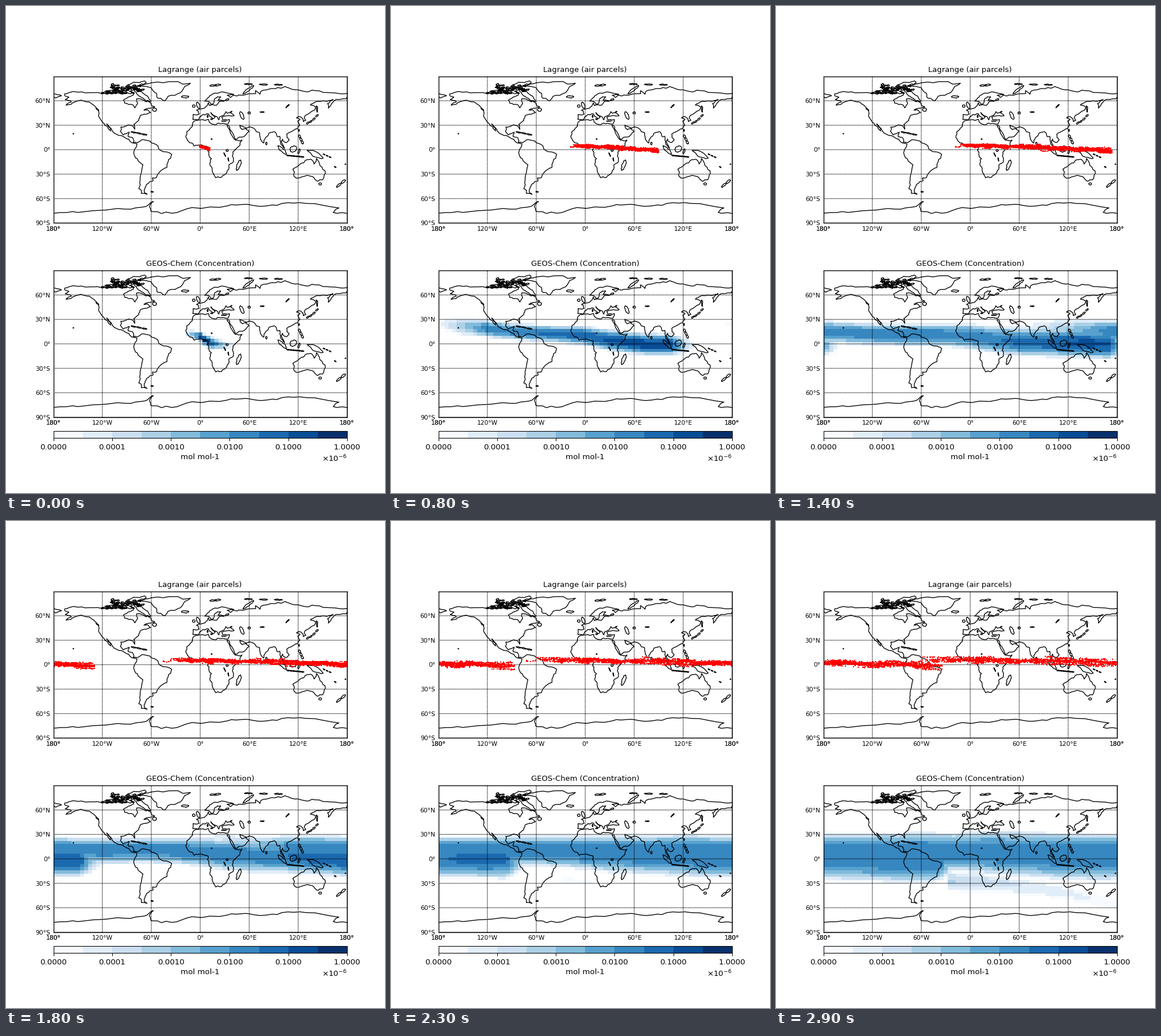
A matplotlib script that plays this animation: 660x849 px, repeating every 3000 ms.

```python
import numpy as np
import matplotlib.pyplot as plt
from matplotlib.animation import FuncAnimation
from matplotlib.collections import LineCollection
from matplotlib.colors import ListedColormap

W, H, DPI = 660, 849, 96
FRAMES, INTERVAL = 30, 100
LEFT, RIGHT = 82.5, 594.0
TOPS = (122.6, 461.1)
MAP_H = (RIGHT - LEFT) / 2

rng = np.random.default_rng(4)
plt.rcParams["font.family"] = "DejaVu Sans"
fig = plt.figure(figsize=(W / DPI, H / DPI), dpi=DPI, facecolor="white")
blues = ListedColormap(plt.get_cmap("Blues")(np.linspace(0, 1, 10)))

# ---------- coastlines: a few key points, roughened by midpoint displacement ----------
coasts = []


def roughen(pts, amount=0.09, rounds=2):
    for _ in range(rounds):
        step = np.diff(pts, axis=0)
        size = np.minimum(np.hypot(*step.T), 8)[:, None]
        mids = pts[:-1] + step / 2 + rng.normal(0, amount, step.shape) * size
        out = np.empty((2 * len(pts) - 1, 2))
        out[::2], out[1::2] = pts, mids
        pts = out
    return pts


def coast(*coords):
    coasts.append(roughen(np.array(coords, float).reshape(-1, 2)))


def isle(lon, lat, rx, ry, tilt=0, amount=0.09):
    """A ragged ellipse; tilt is in degrees."""
    a = np.linspace(0, 2 * np.pi, 9)
    z = (rx * np.cos(a) + 1j * ry * np.sin(a)) * np.exp(1j * np.radians(tilt))
    coasts.append(roughen(np.c_[lon + z.real, lat + z.imag], amount))


def chain(start, end, count, rx, ry, bow=0):
    """Islands strung along a bowed line."""
    tilt = np.degrees(np.arctan2(end[1] - start[1], end[0] - start[0]))
    for s in (np.arange(count) + .5) / count:
        lon, lat = np.array(start) + s * np.subtract(end, start)
        isle(lon, lat + bow * np.sin(np.pi * s), rx, ry, tilt)


# North America: Arctic, Atlantic and Gulf shores
coast(-166, 66, -166, 68.5, -156.5, 71.3, -141, 69.7, -129, 70, -115, 68.5, -95, 68,
      -95, 71.5, -86, 68.5, -82, 69.5, -82, 67, -87, 65, -94, 61, -92.5, 57, -82.5, 55,
      -80, 51.3, -76.7, 56.5, -78, 62.4, -70, 61, -66, 58.7, -64.5, 60.3, -60, 55,
      -55.7, 52.3, -66, 50.2, -69, 48.5, -65, 49, -61, 45.5, -66, 43.6, -70, 43,
      -74, 40.6, -76, 35.3, -81.4, 31, -80.3, 25.2, -82.7, 29, -89.5, 29.8, -97.3, 27.8,
      -97.8, 22.5, -94.5, 18.2, -90.5, 19.8, -87, 21.5, -88.3, 16, -83.3, 15, -82, 9, -77, 8.5)
# South America, then the Pacific shore up to Alaska
coast(-77, 8.5, -72, 12, -62, 10.7, -52, 4.9, -50, 0, -35, -6, -39, -13.5, -41, -22,
      -48.5, -26, -53.5, -34, -58.3, -34.5, -58, -38.3, -62.2, -39.5, -65, -42, -67.5, -46,
      -68.5, -52, -65.2, -54.7, -72, -53.8, -75.3, -48, -73.7, -38, -70.3, -18.5,
      -76, -14, -81.3, -5, -80, 1, -77.5, 7, -80, 8, -83, 8.3, -87.6, 13, -94.3, 16.2,
      -105.6, 20.2, -109, 25.7, -114.7, 31.7, -109.8, 23, -115, 29, -120.6, 34.5,
      -124.3, 40.3, -124.6, 48.3, -130.2, 54.5, -136, 58.5, -146, 60.8, -154, 58.5,
      -164.5, 54.6, -158, 58.5, -165.5, 61.5, -161, 64.5, -166, 66)
# Greenland
coast(-73, 78.3, -60, 76, -54, 69.5, -51.5, 63, -43, 60, -39.5, 65.5, -24, 70, -20, 76,
      -12, 81.5, -33, 83.5, -60, 82, -73, 78.3)
# Northern and eastern Asia
coast(26, 71, 41, 67.7, 33, 66.7, 37, 64, 44, 66, 47, 67, 68, 68.8, 68, 72.5, 73, 68,
      75, 72, 87, 75, 104, 77.6, 113, 74, 130, 71, 140, 72.5, 160, 69.8, 180, 69)
coast(-180, 69, -170, 66.2, -180, 65)
coast(180, 65, 179, 62.5, 164, 60, 157, 51, 156, 56.5, 163, 61.5, 155, 59.3, 143, 59.3,
      135, 54.7, 141, 53, 140, 48.5, 127.5, 39.7, 129.4, 36, 126.4, 34.5, 126, 37.7,
      121.5, 40.5, 118, 39, 122.3, 37.3, 119.5, 35, 121.8, 30, 119, 25.5, 110, 21.3,
      106, 19, 109, 12, 105, 8.7, 101, 13, 99.3, 10, 103.5, 1.4, 98.5, 8, 97.5, 16.5,
      94.3, 16, 91, 22.2)
# Southern Asia, then around Africa
coast(91, 22.2, 87, 21.3, 80.2, 15, 77.5, 8.1, 73, 17, 72.7, 21, 69, 22, 67, 25, 57, 26.5,
      48.5, 30, 51.5, 24.5, 56.3, 26, 59.8, 22.5, 52, 15.5, 43.3, 12.8, 39, 21.5, 34.9, 29.4,
      32.6, 29.9, 37.2, 20, 43.2, 11.6, 51.2, 11.8, 48, 4.5, 40, -2.8, 40.6, -15, 35, -20,
      35, -24, 32, -28.8, 26, -34, 19, -34.5, 14.5, -22.5, 11.8, -17, 13.8, -11, 9, -1,
      9.5, 3.5, 6, 4.3, 1, 5.9, -7.5, 4.4, -13, 8.5, -17.3, 14.7, -16.5, 22, -9.8, 29.8,
      -6, 35.8, 10, 37.3, 10.8, 34.3, 19, 30.4, 22, 32.6, 34, 31.3)
# Mediterranean, western Europe and the Baltic
coast(34, 31.3, 36, 36.8, 27.5, 36.8, 26.5, 39.8, 29, 41, 41.5, 41.6, 37.5, 45, 39, 47.2,
      33.6, 44.7, 31, 46.5, 28, 42, 23.5, 40, 22.8, 36.5, 19.5, 41, 13, 45.5, 18.4, 40,
      15.7, 38, 10, 44, 3.2, 43.2, -2, 36.8, -9, 37, -8.8, 43.2, -1.5, 43.6, -4.6, 48.3,
      1.5, 50.2, 8.5, 54, 10, 57.5, 11, 54.2, 20, 54.5, 23.5, 59.2, 30, 59.9, 22, 60.5,
      25, 65, 21, 65, 17.3, 61.5, 16.5, 57, 13, 55.5, 10.5, 59, 5.5, 59.5, 11, 64.7, 18, 69.5,
      26, 71)
# Australia and New Guinea
coast(142.5, -10.8, 146.5, -19, 153, -26, 150, -37, 143.5, -38.8, 137.5, -33, 131, -31.5,
      118, -35, 115.2, -33, 113.5, -24, 122, -18, 131, -12.2, 136.5, -12.2, 139.5, -17.6,
      142.5, -10.8)
coast(131, -.8, 145, -4.3, 150.7, -10.4, 138, -8, 131, -.8)
# Antarctica
coast(-180, -78, -150, -77, -115, -74, -85, -73, -68, -70, -57.5, -63.5, -62, -69, -60, -76,
      -35, -78, -10, -71, 33, -69, 55, -67, 75, -69.5, 100, -66, 130, -66, 170, -71.5,
      163, -77, 180, -78.2)

# Arctic archipelago
isle(-72, 67.5, 14, 2.6, -38, .13)
isle(-79, 80, 13, 2.6, 12, .13)
isle(-110, 71, 7, 1.9, 0, .13)
for _ in range(42):
    isle(rng.triangular(-122, -88, -70), rng.uniform(68.5, 80.5),
         rng.uniform(1.2, 4), rng.uniform(.4, 1.1), rng.uniform(-25, 25), .16)
# island arcs: Antilles, Svalbard to Severnaya, Japan, Philippines, Sunda, Melanesia
chain((-85, 22), (-65, 18), 3, 3.2, .6)
chain((13, 78.5), (24, 79.5), 2, 4, 1)
chain((50, 80.5), (105, 79.5), 3, 5, .7)
chain((130, 32), (145, 44), 4, 2, .9, -2)
chain((121, 18), (126, 7), 3, 2.2, 1.2)
chain((95, 5), (106, -6), 1, 7.5, 1.7)
chain((106, -7), (127, -9), 6, 1.9, .5)
chain((150, -5), (161, -10), 3, 1.4, .4)
chain((167, -46), (178, -37), 2, 3.6, 1.2)
# single islands and lakes: lon, lat, half width, half height, tilt
for spot in [(-2.5, 54.5, 4.3, 1.7, 110), (-8, 53.5, 1.7, 1.6, 0), (-18.5, 65, 4.6, 1.3, 0),
             (59, 73.5, 8.5, 1.6, 38), (143, 50, 4, .7, 95), (114, .8, 4.6, 3.6, 40),
             (121, -2, 3.4, .9, 70), (47, -19, 7, 2.2, 72), (81, 7.6, 1, 1.6, 0),
             (147, -42, 1.8, 1.4, 0), (-56, 49, 2.6, 2, 0), (-126, 49.4, 2.4, .5, -40),
             (9, 41, .6, 1.6, 0), (14, 37.5, 1.3, .6, 0), (29, 35.1, 3, .2, 0),
             (51, 42, 5.2, 2, 115), (60, 45, 1.6, 1.4, 0), (76, 46.2, 2.6, .5, 0),
             (33, 61.3, 2.4, .8, 20), (107, 53.5, 3, .5, 45), (33, -1, 1.4, 1.3, 0),
             (30, -6, 2.6, .3, 115), (34.5, -12, 2.2, .3, 100), (14, 13, .7, .5, 0),
             (-155.5, 19.6, .5, .4, 0), (-59, -51.8, 1.6, .5, 0), (121, 23.7, .6, 1.3, 0),
             (165.5, -21.3, 1.4, .4, -35), (178, -17.8, .6, .4, 0)]:
    isle(*spot)


# ---------- page layout ----------
def add_box(top, height):
    ax = fig.add_axes([LEFT / W, 1 - (top + height) / H, (RIGHT - LEFT) / W, height / H])
    ax.set_facecolor("none")
    return ax


def put(x, y, text, size, ha="center"):
    fig.text(x / W, 1 - y / H, text, size=size, ha=ha, va="baseline")


def degrees(value, pos, neg):
    return f"{abs(value)}°" + ("" if value % 180 == 0 else pos if value > 0 else neg)


def add_map(top, title):
    ax = add_box(top, MAP_H)
    ax.set(xlim=(-180, 180), ylim=(-90, 90), xticks=[], yticks=[])
    grid = dict(color="k", lw=1, dashes=[1, 1], zorder=3, snap=False)
    scale = MAP_H / 180
    for lon in range(-180, 181, 60):
        ax.axvline(lon, **grid)
        for _ in range(2 if abs(lon) == 180 else 1):
            put(LEFT + (lon + 180) * scale, top + MAP_H + 13.6, degrees(lon, "E", "W"), 8)
    for lat in range(-90, 61, 30):
        ax.axhline(lat, **grid)
        put(77.3, top + (90 - lat) * scale + 4, degrees(lat, "N", "S"), 8, "right")
    ax.add_collection(LineCollection(coasts, colors="k", linewidths=1, zorder=4))
    for side in ax.spines.values():
        side.set(linewidth=1, zorder=6)
    put((LEFT + RIGHT) / 2, top - 8, title, 9.8)
    return ax


parcel_ax = add_map(TOPS[0], "Lagrange (air parcels)")
cell_ax = add_map(TOPS[1], "GEOS-Chem (Concentration)")

bar = add_box(740.7, 12.6)
bar.pcolormesh(np.arange(11), [0, 1], np.arange(10)[None], cmap=blues, vmin=-.5, vmax=9.5)
bar.set_yticks([])
bar.set_xticks(range(0, 11, 2), [f"{v:.4f}" for v in (0, 1e-4, 1e-3, 1e-2, .1, 1)])
bar.tick_params(labelsize=10, length=3.5, width=.8, pad=3.5)
put((LEFT + RIGHT) / 2, 790.5, "mol mol-1", 10)
put(RIGHT, 794, r"$\times\mathdefault{10^{-6}}$", 10, "right")

# ---------- concentration plume ----------
LON, LAT = np.meshgrid(np.arange(-180, 181, 5), np.arange(-88, 89, 4))


def ridge(x, t):
    """Plume level along unwrapped longitude x, spreading both ways round the globe."""
    east_gap = 38 + 12 * t - .05 * t * t - x
    west_gap = x + 18 + 20 * t
    core, core_x = 9.8 - .1 * t, 10 + 9.7 * t
    peak = np.maximum(core - .013 * np.abs(x - core_x), 6.75)
    peak = np.minimum(peak, 1 + .28 * east_gap)
    peak = np.minimum(peak, 1 + (.4 * np.exp(-t / 4.5) + .035) * west_gap)

    east, west = np.maximum(x, 0), np.maximum(-x, 0)
    mid = 9 + .3 * np.exp(-t / 6) * west - 12 * (1 - np.exp(-east / (12 + 6 * t)))
    mid = mid + .8 * np.sin(x / 25 + t / 5)
    blend = 1 / (1 + np.exp(-x / 20))
    half = 7 + .55 * t + blend * (2 + .17 * t)
    half = half * np.clip(.55 + np.minimum(east_gap, west_gap) / 60, .4, 1)
    d = np.abs(LAT - mid) / half
    return peak - np.maximum(peak, 1) * d ** (1.7 + .025 * t)


def wisp(t):
    """Faint southern band that appears late."""
    curve = -28 - .05 * LON - .0006 * LON ** 2
    level = 2.8 - .012 * LON - .45 * (29 - t) - 1.2 * ((LAT - curve) / 8) ** 2
    return np.where(LON > -30, level, -1)


def levels(t):
    field = np.maximum.reduce([ridge(LON + turn, t) for turn in (-360, 0, 360)] + [wisp(t)])
    return np.ma.masked_less(np.floor(np.minimum(field, 9)), 0)


mesh = cell_ax.pcolormesh(np.arange(-182.5, 183, 5), np.arange(-90, 91, 4), levels(0),
                          cmap=blues, vmin=-.5, vmax=9.5, zorder=1)

# ---------- air parcels ----------
GROUPS, EACH = 340, 10
N = GROUPS * EACH


def grouped(values, jitter):
    return np.repeat(values, EACH) + rng.normal(0, jitter, N)


along = np.clip(grouped(rng.beta(1.5, 1.15, GROUPS), .012), 0, 1)
offset = grouped(rng.normal(0, 1, GROUPS), .2)
phase = grouped(rng.uniform(0, 2 * np.pi, GROUPS), 0)
dots, = parcel_ax.plot([], [], "s", color="red", ms=1.5, mew=0, zorder=5)


def parcels(t):
    tail = np.interp(t, [0, 6, 14, 22], [-1, -18, -18, -72])
    head = np.interp(t, [0, 8, 18, 29], [12, 90, 230, 325])
    course = [4.2 + .1 * t, 2.5 + .04 * t, max(.5 - .35 * t, -1.5)]
    sway = .35 * np.sin(phase + .25 * t)
    lat = np.interp(along, [0, .5, 1], course) + (.6 + .045 * t) * (offset + sway)
    lon = tail + (head - tail) * along
    return (lon + 180) % 360 - 180, lat


def draw(frame):
    dots.set_data(*parcels(frame))
    mesh.set_array(levels(frame))
    return dots, mesh


anim = FuncAnimation(fig, draw, frames=FRAMES, interval=INTERVAL,
                     init_func=lambda: draw(0), repeat=True, blit=False)
plt.show()
```
